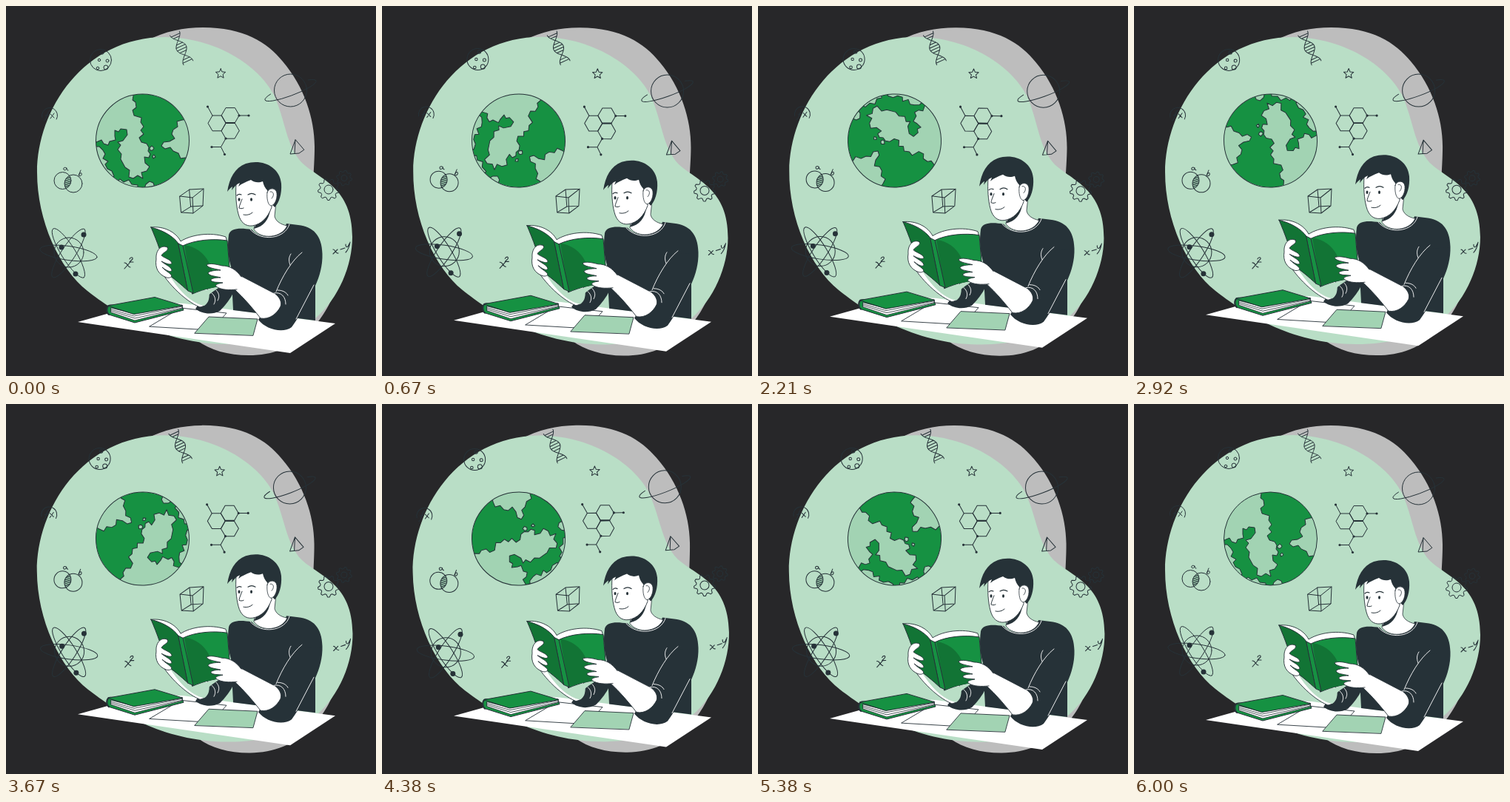
Write an HTML page with a canvas that moves like this. It is 500 px wide and 500 px high and loops after 6.04 s.

```html
<!DOCTYPE html>
<html lang="en">
<head>
<meta charset="utf-8">
<title>Reading student</title>
<style>
html, body { margin: 0; width: 100%; height: 100%; overflow: hidden; background: #272729; }
canvas { display: block; width: 500px; height: 500px; }
</style>
</head>
<body>
<canvas id="c"></canvas>
<script>
const LOOP = 6040, CYCLE = 6000, TAU = Math.PI * 2;
const INK = '#263238', GREEN = '#169142', SHADE = '#127435', MINT = '#a2d3b3',
  PALE = '#b9dec6', GREY = '#bdbdbd', WHITE = '#fff', BACK = '#272729';
const cv = document.getElementById('c'), g = cv.getContext('2d');
const dpr = Math.max(1, window.devicePixelRatio || 1);
cv.width = cv.height = 500 * dpr;

const cache = {};
function path(d, fill, stroke, w = 1) {
  const p = cache[d] || (cache[d] = new Path2D(d));
  if (fill) { g.fillStyle = fill; g.fill(p); }
  if (stroke) { g.strokeStyle = stroke; g.lineWidth = w; g.stroke(p); }
}
const line = (d, w = 1) => path(d, null, INK, w);

function oval(x, y, rx, ry = rx, rot = 0, fill = null, a = 0, b = TAU) {
  g.beginPath();
  g.ellipse(x, y, rx, ry, rot, a, b);
  if (fill) { g.fillStyle = fill; g.fill(); }
  else { g.strokeStyle = INK; g.lineWidth = 1; g.stroke(); }
}
const dot = (x, y, r) => oval(x, y, r, r, 0, INK);

// closed outline given by radius as a function of the step
function ring(x, y, n, radius, start = -Math.PI / 2) {
  g.beginPath();
  for (let i = 0; i < n; i++) {
    const a = start + i * TAU / n, r = radius(i);
    g.lineTo(x + r * Math.cos(a), y + r * Math.sin(a));
  }
  g.closePath();
  g.strokeStyle = INK; g.lineWidth = 1; g.stroke();
}

function blobs() {
  path('M190 47C215 34 240 29 266 29C321 29 353 49 374 75C403 109 417 152 417 190C417 206 416 218 415 240L450 370C440 402 428 420 414 436C388 462 360 472 328 472C300 472 276 465 258 452L200 300Z', GREY);
  path('M42 225C42 140 105 42 215 42C284 43 341 80 362 120C378 155 378 188 400 212C425 235 468 245 468 312C468 350 450 395 418 422C390 446 345 457 300 457C210 457 146 413 110 385C72 355 42 290 42 225Z', PALE);
}

function dna() {
  const at = (s, k) => {
    const o = k * 7 * Math.cos(TAU * s);
    return [228 + 18 * s + 0.91 * o, 37 + 39 * s - 0.42 * o];
  };
  g.strokeStyle = INK; g.lineWidth = 1;
  g.beginPath();
  for (const k of [-1, 1]) {
    g.moveTo(...at(0, k));
    for (let s = 0.02; s <= 1.04; s += 0.02) g.lineTo(...at(s, k));
  }
  for (const s of [0.06, 0.14, 0.36, 0.45, 0.54, 0.63, 0.87, 0.96]) {
    g.moveTo(...at(s, -1));
    g.lineTo(...at(s, 1));
  }
  g.stroke();
}

function venn() {
  g.save();
  g.beginPath(); g.arc(76.5, 236, 11.5, 0, TAU); g.clip();
  g.beginPath(); g.arc(91, 240, 12, 0, TAU); g.clip();
  oval(84, 238, 20, 20, 0, MINT);
  for (let y = 222; y < 256; y += 2.6) line(`M76 ${y + 3}L92 ${y - 3}`, 1.1);
  g.restore();
  oval(76.5, 236, 11.5);
  oval(91, 240, 12);
  line('M82 219C79 217 77 219 78 221C79 223 82 221 82 219C82 221 82 222 84 222');
  line('M101 222L98 229C101 231 103 228 102 226C101 225 99 226 99 228');
}

function molecule() {
  for (const [x, y] of [[303, 148], [285, 158.4], [303, 168.8]]) ring(x, y, 6, () => 12, 0);
  line('M297 158L309 158', 1.8);
  line('M315 148H328M279 148L272.5 136M297 179L290.5 190.5H278M290.5 190.5L295.5 200.5');
  for (const [x, y] of [[272.5, 136], [328, 148], [315, 148], [297, 179], [278, 190.5], [295.5, 200.5]]) dot(x, y, 1.6);
}

function gear(x, y, r, hole, teeth) {
  ring(x, y, teeth * 4, i => i % 4 < 2 ? r : r * 0.78, 0.1);
  oval(x, y, hole);
}

function icons() {
  oval(128, 73, 14.5);
  for (const [x, y, r] of [[126, 73, 1.7], [135, 83, 3], [137, 74, 2], [124, 84, 1.8], [130, 63, 2.2]]) oval(x, y, r);
  dna();
  ring(290, 91.5, 10, i => i % 2 ? 3.2 : 7);
  oval(384.5, 114, 22);
  oval(384.5, 114, 37, 7, -0.36, null, -0.75, Math.PI + 0.75);
  oval(59, 148, 10.5, 10.5, 0, null, 2.9, TAU + 0.5);
  line('M51 155C55 156 55 142 59 141M53 148L58 147M60 146L65 151M65 145L60 152');
  venn();

  for (const a of [0.14, 1.01, -0.99]) oval(84.5, 334, 39, 9.5, a);
  oval(85, 333, 20);
  dot(105, 309, 3.5); dot(75, 326, 3.5); dot(94, 362, 3.5);

  line('M160 347C164 346 164 353 168 353M168 346L160 355M167 342C168 339 172 339 171 342L167 346H172', 1.1);
  molecule();
  line('M391 181L384 200L396 199L402.5 194.5ZM391 181L390 199.5');
  gear(436, 248, 14.5, 6, 9);
  gear(457, 232.5, 10.5, 4, 8);
  line('M235 257L252 259L253 280L237 279ZM248 248L267 247L266 270L250 271ZM235 257L248 248M252 259L267 247M253 280L266 270M237 279L250 271');
  line('M442 329C445 328 445 335 449 334M448 329L442 335M452 329L458 327M459 322C459 327 462 327 464 321M465 319C464 325 462 330 459 333', 1.1);
}

const SEAS = [
  'M172 100V121L171 127L175 130L176 137L171 141L173 148L183 151L182 157L186 163L182 168L186 173L180 178L183 184L190 186L193 191L192 196L195 200L193 205L187 204L188 212L194 217L190 223L183 225L185 233L178 229L172 233L166 231L167 222L161 218L155 207L156 200L151 194L155 188L151 184L158 182L164 174L163 167L155 166L152 170L147 168L147 176L148 181L140 183L138 188L132 186L129 181L122 184H100V100Z',
  'M110 190L126 190L131 195L134 200L131 206L138 210L134 214L137 220L143 223L146 230L130 240L110 220Z',
  'M260 152L238 154L231 156L232 163L226 167L224 173L228 179L221 183L213 184L210 189L215 193L222 191L226 196L233 199L236 206L242 205L260 212Z',
  'M144 244L154 234L159 238L166 235L170 241L178 242V255H140Z',
  'M186 250L189 241L194 237L199 239L203 250Z',
  'M194 192L197 189L200 192L198 195L195 195Z',
  'M198 203L200 201L202 204L199 206Z'
];

function globe(turn) {
  g.save();
  g.translate(184.5, 182);
  g.rotate(turn * TAU);
  g.translate(-184.5, -182);
  g.save();
  g.beginPath(); g.arc(184.5, 182, 63, 0, TAU); g.clip();
  g.fillStyle = GREEN; g.fill();
  for (const d of SEAS) path(d, MINT, INK, 1);
  g.restore();
  oval(184.5, 182, 63);
  g.restore();
}

function table() {
  path('M97 427L190 401L240 402L445 429L384 469Z', WHITE);
  path('M194 433L236 408L298 415L290 424L262 437Z', WHITE, INK, 0.9);
  path('M255 442L274 420L340 423L334 445Z', MINT, INK, 0.9);
  // closed book
  path('M140 404C135 404 135 416 139 417L174 428L240 411L238 406Z', GREEN, INK);
  path('M142 408L173 416L238 404V409L174 425L142 414Z', WHITE, INK, 0.8);
  line('M142 410L173 419L238 406M142 412L174 422L238 408', 0.8);
  path('M138 405L201 393.5L239 405L173 416.5Z', GREEN, INK);
  line('M138.5 405C135 408 136 415 139 417', 2);
}

function head() {
  path('M338 280L335 302C345 316 372 314 380 297C370 295 364 290 363 284L365 265Z', WHITE, INK, 0.8);
  path('M335 301C348 298 355 289 357 276L340 290Z', INK);
  path('M311 240C310 255 311 270 314 281C317 293 324 298 333 297C345 295 354 286 359 272L360 238L335 228Z', WHITE, INK, 0.9);
  path('M299 251C302 232 309 219 324 213C346 206 370 217 372 240C373 254 369 266 363 272L358 266L353 249C350 246 348 242 347 237C342 239 336 239 331 235C324 238 318 240 314 244L316 239C311 241 308 245 305 249L306 244C303 246 301 248 299 251Z', INK);
  path('M353 252C355 245 365 245 366 253C367 262 362 270 358 270C354 269 352 260 353 252Z', WHITE, INK, 0.8);
  line('M357 251C362 250 363 256 359 260', 0.8);
  line('M312 256C314 254 316 254 318 255M327 255C330 253 334 253 337 255', 1.2);
  oval(315, 261.5, 1.5, 2.2, 0, INK);
  oval(331.5, 261.5, 1.5, 2.2, 0, INK);
  line('M319 261C317 266 315 271 315 273C317 274 319 274 321 273M321 282C325 283 330 282 333 279');
}

function body() {
  path('M332 302C318 300 304 299 301 309C299 325 300 340 304 352L307 411L418 425V378C424 365 428 350 427.5 335C427 310 415 298 395 296L379 294C374 312 346 318 332 302Z', INK);
  path('M330 302C345 319 377 315 383 295', null, WHITE, 0.9);
}

function farArm() {
  path('M304 370L284 383C272 391 262 400 256 409C264 416 278 418 289 412C297 404 303 396 308 386Z', INK);
  path('M206 352C214 370 240 398 262 407C268 406 273 402 274 396L272 380L224 358Z', WHITE, INK, 0.9);
  path('M219 361L252 386L274 383C276 393 274 401 268 405C250 402 233 384 219 361Z', PALE);
  path('M284 384C288 388 289 393 286 398M278 388C283 392 284 398 281 403', null, WHITE, 0.9);
}

function openBook() {
  path('M196 299C214 297 230 306 236 318C250 309 276 305 297 312L299 320L238 328Z', WHITE, INK, 0.9);
  path('M196 299C212 303 226 311 233 321L246 385C236 376 226 367 216 361C212 338 204 318 196 299Z', SHADE, INK);
  path('M239 324C255 316 280 314 299 317L304 377C286 378 268 382 252 389Z', GREEN, INK);
  path('M241 323C256 325 268 334 274 346L288 379C275 381 262 384 252 388Z', SHADE);
  path('M233 321L239 324L253 388L246 385Z', GREEN, INK);
}

function farHand() {
  path('M218 326C209 322 202 331 203 342C201 354 206 363 217 367C222 368 225 366 223 363C219 359 214 357 211 353C216 357 223 361 224 357C223 352 214 349 210 345C216 348 224 351 224 347C222 342 214 341 210 337C213 332 221 331 218 326Z', WHITE, INK, 0.9);
}

const FINGERS = 'M318 366C311 356 302 351 292 351C284 349 275 347 271 350C273 354 282 355 290 357C283 357 274 358 273 361C275 365 283 365 290 367C284 367 276 368 277 371C280 374 287 373 293 374C288 375 282 376 284 379C291 384 302 384 312 383';

function nearArm() {
  path('M427 336C428 355 419 366 414 382C405 402 396 421 386 434C374 443 351 437 341 424L362 388C372 376 378 356 390 338Z', INK);
  path('M316 364L364 389C370 394 373 400 371 406C366 416 356 424 344 422C333 408 322 395 309 383Z', WHITE, INK, 0.9);
  path(FINGERS, WHITE);
  line(FINGERS, 0.9);
  path('M416 377L392 423M400 333C386 344 373 366 365 386M384 350C381 343 383 338 385 335M362 388C372 386 378 393 378 403M367 384C374 384 379 387 381 391', null, WHITE, 0.9);
}

function draw(now) {
  const p = Math.min(now % LOOP, CYCLE) / CYCLE;
  const sway = p < 0.25 ? 4 * p : p < 0.75 ? 2 - 4 * p : 4 * p - 4;
  const lift = -10 * (1 - Math.abs(1 - 2 * p));

  g.setTransform(dpr, 0, 0, dpr, 0, 0);
  g.lineJoin = g.lineCap = 'round';
  g.fillStyle = BACK;
  g.fillRect(0, 0, 500, 500);

  g.save();
  g.translate(250, 250);
  g.rotate(sway * Math.PI / 180);
  g.translate(-250, -250);
  blobs();
  icons();
  g.restore();

  globe(p);

  g.save();
  g.translate(0, lift);
  table();
  body();
  head();
  farArm();
  openBook();
  farHand();
  nearArm();
  g.restore();
}

function tick() {
  draw(performance.now());
  requestAnimationFrame(tick);
}
tick();
</script>
</body>
</html>
```
